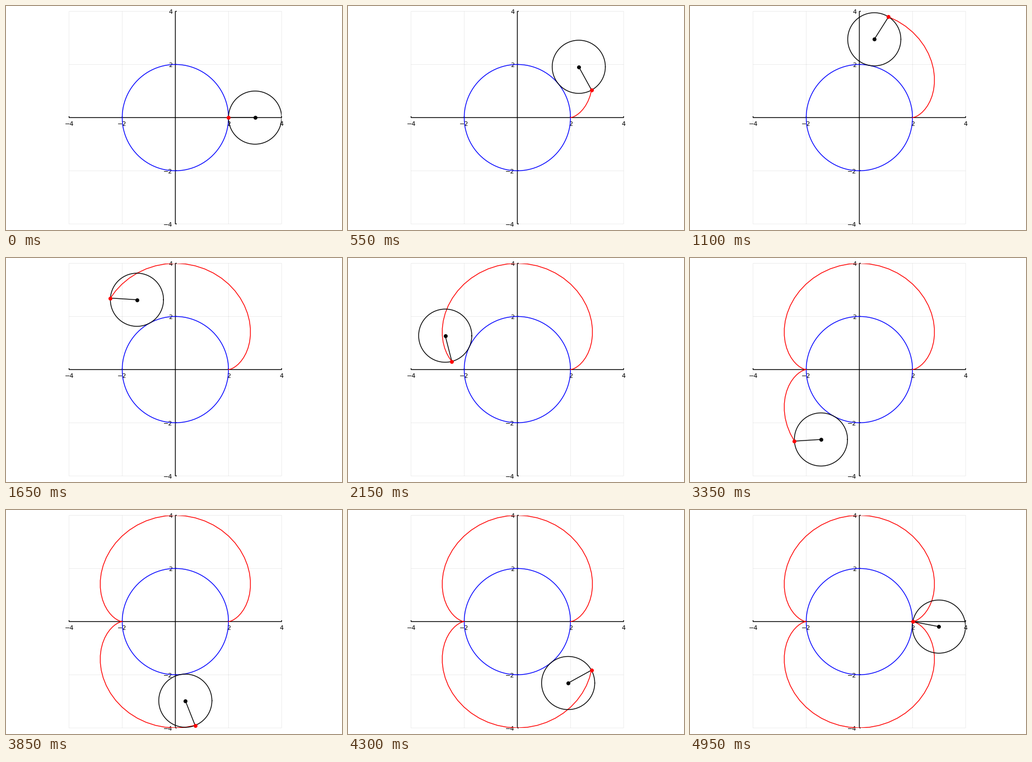
A matplotlib script for the animation above (5 s loop, 600x400 px).

```python
import numpy as np
import matplotlib.pyplot as plt
from matplotlib.animation import FuncAnimation

W, H = 600, 400
FRAMES, INTERVAL = 100, 50
CX, CY, UNIT = 302.4, 199.3, 47.45   # origin and unit length in pixels
LIM = 4
R, r = 2, 1                          # fixed and rolling radii

plt.rcParams["font.family"] = "DejaVu Sans"
fig = plt.figure(figsize=(W / 100, H / 100), dpi=100, facecolor="white")
side = 2 * LIM * UNIT
ax = fig.add_axes([(CX - side / 2) / W, 1 - (CY + side / 2) / H,
                   side / W, side / H])
ax.set_xlim(-LIM, LIM)
ax.set_ylim(-LIM, LIM)
ax.axis("off")


def line(x, y, color="black", **kw):
    kw = {"lw": 1, "snap": False, **kw}
    return ax.plot(x, y, color=color, **kw)[0]


def dot(color):
    return line([], [], color, marker="o", ms=4, mew=1, ls="none")


def label(value, xy, offset, ha):
    ax.annotate(f"{value}".replace("-", "\u2212"), xy, xytext=offset,
                textcoords="offset pixels", ha=ha, va="baseline",
                fontsize=8, annotation_clip=False, zorder=1)


def draw_axes():
    tick = 2.5 / UNIT
    frame = dict(clip_on=False, solid_capstyle="butt", zorder=1)
    ends = [-LIM, LIM]
    for v in (-4, -2, 2, 4):
        line([v, v], ends, alpha=0.1, **{**frame, "lw": 0.5, "zorder": 0})
        line(ends, [v, v], alpha=0.1, **{**frame, "lw": 0.5, "zorder": 0})
        line([v, v], [0, tick], **frame)
        line([0, tick], [v, v], **frame)
        label(v, (v, 0), (0, -15), "center")
        label(v, (0, v), (-5, -4.5), "right")
    line(ends, [0, 0], **frame)
    line([0, 0], ends, **frame)


def epicycloid(t):
    k = (R + r) / r
    return ((R + r) * np.cos(t) - r * np.cos(k * t),
            (R + r) * np.sin(t) - r * np.sin(k * t))


draw_axes()
turn = np.linspace(0, 2 * np.pi, 201)
line(R * np.cos(turn), R * np.sin(turn), "blue")
trace = line([], [], "red")
wheel = line([], [])
spoke = line([], [])
hub = dot("black")
pen = dot("red")


def update(i):
    angles = 2 * np.pi * np.arange(i + 1) / FRAMES
    xs, ys = epicycloid(angles)
    cx, cy = (R + r) * np.cos(angles[-1]), (R + r) * np.sin(angles[-1])
    trace.set_data(xs, ys)
    wheel.set_data(cx + r * np.cos(turn), cy + r * np.sin(turn))
    spoke.set_data([cx, xs[-1]], [cy, ys[-1]])
    hub.set_data([cx], [cy])
    pen.set_data([xs[-1]], [ys[-1]])
    return trace, wheel, spoke, hub, pen


anim = FuncAnimation(fig, update, frames=FRAMES, interval=INTERVAL,
                     repeat=True, repeat_delay=0)
plt.show()
```
